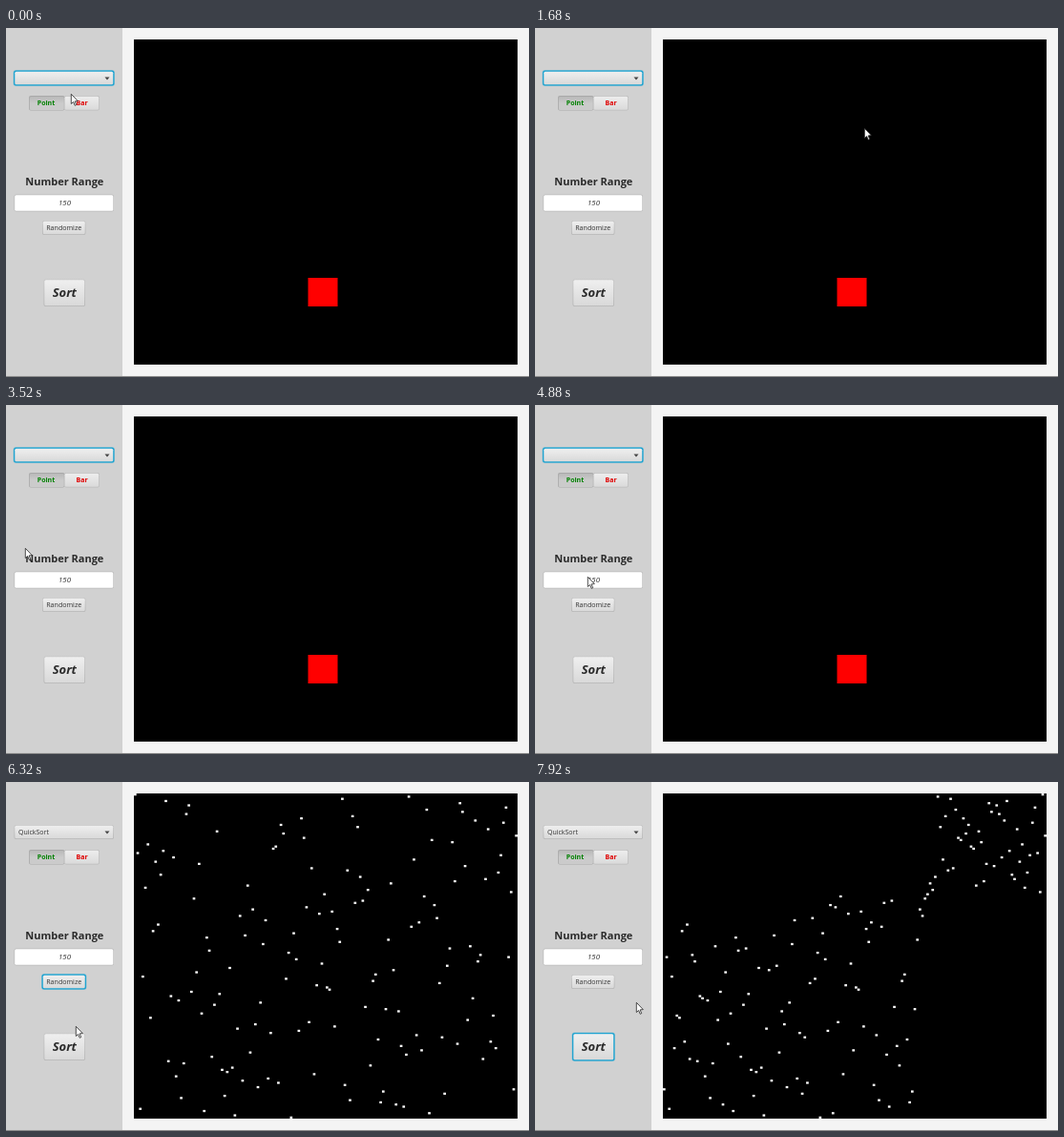
An HTML page with a canvas for the animation above (8 s loop, 548x366 px).

```html
<!DOCTYPE html>
<html lang="en">
<head>
<meta charset="utf-8">
<title>Sorting visualizer</title>
<style>
  html, body { margin: 0; width: 100%; height: 100%; overflow: hidden; background: #f4f4f4; }
  canvas { display: block; width: 548px; height: 366px; }
</style>
</head>
<body>
<canvas id="stage" width="548" height="366"></canvas>
<script>
const ctx = document.getElementById('stage').getContext('2d');
const LOOP = 8000, STEP = 80, COUNT = 150;
const PLOT = { x: 134, y: 12, w: 402, h: 341 };
const FONT = '"Open Sans", "Noto Sans", sans-serif';
const TIME = { pick: 5200, focusRandom: 5760, shuffle: 5920, focusSort: 6720, sort: 6970, firstPass: 870 };

function swap(a, i, j) {
  [a[i], a[j]] = [a[j], a[i]];
}

// Row of each column's point, counted from the top of the plot
function shuffledRows(seed) {
  const rows = Array.from({ length: COUNT }, (_, i) => i);
  for (let i = COUNT - 1; i > 0; i--) {
    seed = (seed * 16807) % 2147483647;
    swap(rows, i, seed % (i + 1));
  }
  // Fix the first two pivots, which set where the plot splits
  swap(rows, 74, rows.indexOf(46));
  swap(rows, 51, rows.indexOf(58));
  return rows;
}

// Quicksort that records its swaps; a low row is a high value
function recordSwaps(a, lo, hi, out) {
  if (lo >= hi) return out;
  const pivot = a[(lo + hi) >> 1];
  let i = lo, j = hi;
  while (i < j) {
    while (a[i] > pivot) i++;
    while (a[j] < pivot) j--;
    if (i < j) {
      swap(a, i, j);
      out.push([i, j]);
    }
  }
  recordSwaps(a, lo, i - 1, out);
  return recordSwaps(a, i + 1, hi, out);
}

const shuffled = shuffledRows(90217);
const swaps = recordSwaps(shuffled.slice(), 0, COUNT - 1, []);
const split = COUNT - 1 - shuffled[74];
const perSwap = TIME.firstPass / swaps.findIndex(([, j]) => j < split);

// [time, x, y] of the pointer's tip
const path = [
  [0, 68, 69], [1040, 68, 69], [1280, 105, 53], [1519, 105, 53],
  [1520, 345, 105], [2240, 345, 105], [2960, 131, 62], [3280, 62, 40],
  [3520, 20, 150], [3840, 50, 107], [4400, 50, 107], [4880, 55, 180],
  [5120, 56, 191], [5440, 79, 211], [5920, 79, 211], [6560, 70, 277],
  [7040, 70, 277], [7840, 106, 231], [8000, 106, 231]
];

function pointerAt(t) {
  const n = path.findIndex(p => p[0] > t);
  const [t0, x0, y0] = path[n - 1], [t1, x1, y1] = path[n];
  const u = (t - t0) / (t1 - t0);
  const e = u * u * (3 - 2 * u);
  return [Math.round(x0 + (x1 - x0) * e), Math.round(y0 + (y1 - y0) * e)];
}

function rect(x, y, w, h, fill) {
  ctx.fillStyle = fill;
  ctx.fillRect(x, y, w, h);
}

function round(x, y, w, h, r, fill) {
  ctx.beginPath();
  ctx.roundRect(x, y, w, h, r);
  ctx.fillStyle = fill;
  ctx.fill();
}

function shade(y, h, top, bottom) {
  const g = ctx.createLinearGradient(0, y, 0, y + h);
  g.addColorStop(0, top);
  g.addColorStop(1, bottom);
  return g;
}

function text(str, x, y, style, color = '#333', align = 'center') {
  ctx.font = style + ' ' + FONT;
  ctx.textAlign = align;
  ctx.fillStyle = color;
  ctx.fillText(str, x, y);
}

function button(x, y, w, h, focused) {
  if (focused) {
    round(x - 1, y - 1, w + 2, h + 2, 3, 'rgba(3,158,211,0.3)');
    round(x - 0.5, y - 0.5, w + 1, h + 1, 2.5, '#1fa3d0');
  } else {
    round(x, y, w, h, 2, shade(y, h, '#c6c6c6', '#b4b4b4'));
  }
  round(x + 0.8, y + 0.8, w - 1.6, h - 1.6, 1.5, shade(y, h, '#f0f0f0', '#d8d8d8'));
}

function drawPanel(t) {
  rect(0, 0, 548, 366, '#f4f4f4');
  rect(0, 0, 122, 366, '#d1d1d1');

  button(8.5, 45, 104.5, 15, t < TIME.focusRandom);
  ctx.beginPath();
  ctx.moveTo(103.5, 51.5);
  ctx.lineTo(108.5, 51.5);
  ctx.lineTo(106, 54.5);
  ctx.fillStyle = '#444';
  ctx.fill();
  if (t >= TIME.pick) text('QuickSort', 13, 55.3, '7px', '#333', 'left');

  round(24, 71, 37.5, 15.5, 2, '#a9a9a9');
  round(24.8, 72, 36, 14, 1.5, shade(72, 7, '#b9b9b9', '#cbcbcb'));
  round(61, 71, 37, 15.5, 2, '#bdbdbd');
  round(61.6, 71.8, 35.6, 13.9, 1.5, shade(71, 15, '#eeeeee', '#dadada'));
  text('Point', 42, 81.4, 'bold 7px', '#008000');
  text('Bar', 79.5, 81.4, 'bold 7px', '#e00000');

  text('Number Range', 61.3, 165.4, 'bold 11px', '#2b2b2b');
  round(8.5, 174.5, 104.5, 18, 2, '#bcbcbc');
  round(9.2, 175.2, 103.1, 16.6, 1.5, '#fff');
  text('150', 61.5, 186.2, 'italic 7.8px');

  button(38, 202, 45.5, 15, t >= TIME.focusRandom && t < TIME.focusSort);
  text('Randomize', 60.7, 212.3, '7.1px');

  button(39.5, 263.5, 43.5, 28.5, t >= TIME.focusSort);
  text('Sort', 61.3, 282.4, 'italic bold 13px', '#2b2b2b');

  rect(0, 365, 548, 1, '#8c8c8c');
}

function drawPlot(t) {
  rect(PLOT.x, PLOT.y, PLOT.w, PLOT.h, '#000');
  if (t < TIME.shuffle) {
    rect(316.5, 262, 31, 30, '#f00');
    return;
  }
  const rows = shuffled.slice();
  const done = Math.max(0, Math.floor((t - TIME.sort) / perSwap));
  for (const [i, j] of swaps.slice(0, done)) swap(rows, i, j);
  const w = PLOT.w / COUNT, h = PLOT.h / COUNT;
  rows.forEach((r, i) => rect(PLOT.x + i * w, PLOT.y + r * h, w, h, '#fff'));
}

function drawPointer(x, y) {
  const shape = [[0, 0], [0, 10.2], [2.3, 8.2], [3.9, 12], [5.4, 11.3], [3.8, 7.6], [7, 7.3]];
  ctx.beginPath();
  for (const [dx, dy] of shape) ctx.lineTo(x + dx + 0.3, y + dy + 0.3);
  ctx.closePath();
  ctx.fillStyle = '#fff';
  ctx.fill();
  ctx.lineWidth = 0.8;
  ctx.strokeStyle = '#222';
  ctx.stroke();
}

function frame(now) {
  const t = Math.floor((now % LOOP) / STEP) * STEP;
  drawPanel(t);
  drawPlot(t);
  drawPointer(...pointerAt(t));
  requestAnimationFrame(frame);
}
frame(performance.now());
</script>
</body>
</html>
```
